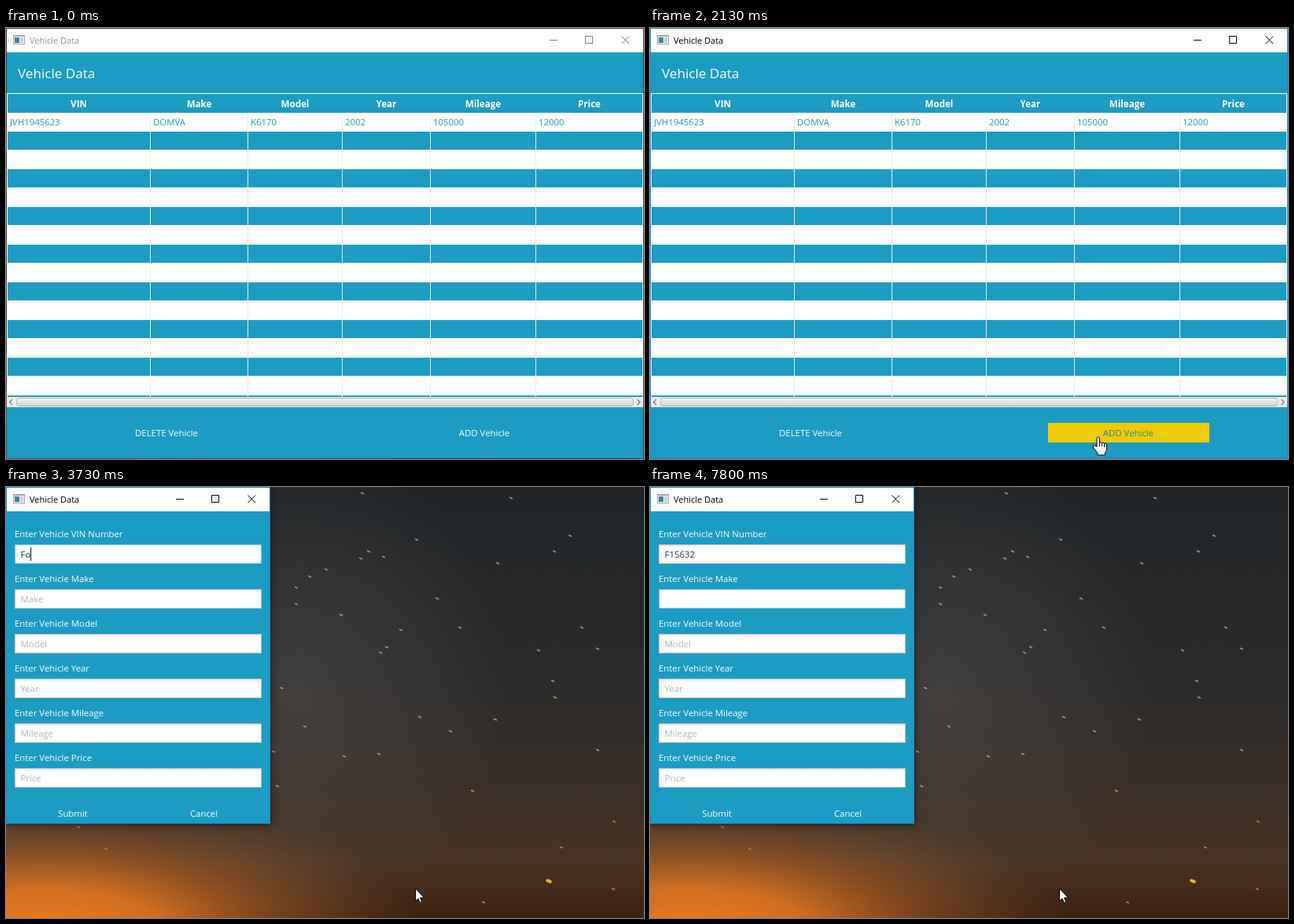
An HTML page that plays this animation: 811 by 549 pixels, repeating every 8000 ms.

```html
<!DOCTYPE html>
<html lang="en">
<head>
<meta charset="utf-8">
<title>Vehicle Data</title>
<style>
  html, body { margin: 0; height: 100%; overflow: hidden; background: #25282c; }
  svg { display: block; width: 100vw; height: 100vh; }
  text { font: 11.4px "Open Sans", "Noto Sans", sans-serif; fill: #fff; white-space: pre; }
  text.title { font-size: 11px; fill: #000; }
  text.heading { font-size: 17.1px; }
  text.bold { font-size: 11.6px; font-weight: 700; }
  text.cell { fill: #1c9cc2; }
  text.prompt { fill: #b2b2b2; }
  text.typed { fill: #333; }
  .mid { text-anchor: middle; }
  .body { fill: #1c9cc2; }
  .frame { fill: none; stroke: #1883d7; }
  .controls { fill: none; stroke: #000; }
  .idle .frame { stroke: rgba(72, 72, 72, .8); }
  .idle .title { fill: #959595; }
  .idle .controls { stroke: #808080; }
  .hot rect { fill: #efcb08; }
  .hot text { fill: #35819a; }
  #form { filter: drop-shadow(0 1px 4px rgba(0, 0, 0, .5)); }
  #arrow, #hand { fill: #fff; stroke: #000; stroke-linejoin: round; }
</style>
</head>
<body>
<svg id="stage" viewBox="0 0 811 549">
  <defs>
    <linearGradient id="sky" x2="0" y2="1">
      <stop offset="0" stop-color="#212528"/>
      <stop offset=".45" stop-color="#2b2b2b"/>
      <stop offset=".68" stop-color="#392f28"/>
      <stop offset=".87" stop-color="#493322"/>
      <stop offset="1" stop-color="#3e210f"/>
    </linearGradient>
    <radialGradient id="haze">
      <stop offset="0" stop-color="#77706c" stop-opacity=".28"/>
      <stop offset="1" stop-color="#77706c" stop-opacity="0"/>
    </radialGradient>
    <radialGradient id="glow">
      <stop offset="0" stop-color="#ec7c22"/>
      <stop offset=".3" stop-color="#e07622" stop-opacity=".9"/>
      <stop offset=".65" stop-color="#b8682c" stop-opacity=".4"/>
      <stop offset="1" stop-color="#8a5a35" stop-opacity="0"/>
    </radialGradient>
    <linearGradient id="thumbFill" x2="0" y2="1">
      <stop offset="0" stop-color="#f4f4f4"/>
      <stop offset="1" stop-color="#d2d2d2"/>
    </linearGradient>
    <linearGradient id="fieldFill" x2="0" y2="1">
      <stop offset="0" stop-color="#e9e9e9"/>
      <stop offset=".16" stop-color="#fff"/>
    </linearGradient>
  </defs>
  <g id="desktop">
    <rect width="811" height="549" fill="url(#sky)"/>
    <ellipse cx="370" cy="250" rx="270" ry="300" fill="url(#haze)"/>
    <ellipse cx="50" cy="560" rx="480" ry="165" fill="url(#glow)"/>
  </g>
  <g id="list"></g>
  <g id="form"></g>
  <path id="arrow" d="M.5.5V16.5L4 13.2 6.4 18.5 8.8 17.4 6.5 12.2H11.6Z"/>
  <path id="hand" d="M-2 1.5a1.75 1.5 0 0 1 3.5 0V7q2-.8 3 .6q2-.8 3 .7q3-.4 3 1.7V15q0 3-2 5V23H-1V20.5L-6 14q-1.5-2 0-3t4 1.5ZM1.5 7v5M4.5 8v4M7.5 9v4"/>
</svg>
<script>
const $ = id => document.getElementById(id);
const desktop = $("desktop"), list = $("list"), form = $("form");
const arrow = $("arrow"), hand = $("hand");

function add(parent, tag, attrs, content = "") {
  const el = document.createElementNS("http://www.w3.org/2000/svg", tag);
  for (const name in attrs) el.setAttribute(name, attrs[name]);
  el.textContent = content;
  return parent.appendChild(el);
}
const box = (parent, x, y, width, height, attrs) =>
  add(parent, "rect", { x, y, width, height, ...attrs });
const label = (parent, x, y, content, cls = "") =>
  add(parent, "text", { x, y, class: cls }, content);
const show = (el, on) => { el.style.display = on ? "" : "none"; };

// Desktop stars: x, y pairs
const stars = [
  642,14, 453,8, 717,62, 522,67, 461,82, 697,82, 480,89, 451,91, 625,97, 407,105,
  386,114, 369,128, 548,142, 369,149, 426,163, 577,179, 732,179, 502,182, 484,204,
  752,206, 677,208, 476,211, 695,247, 350,256, 698,268, 526,293, 622,296, 380,305,
  565,311, 752,335, 340,337, 474,340, 430,343, 345,381, 593,387, 773,426, 92,433,
  706,459, 127,461, 690,502, 772,512, 607,529];
for (let i = 0; i < stars.length; i += 2) {
  const x = stars[i], y = stars[i + 1], gold = x === 690;
  add(desktop, "ellipse", {
    rx: gold ? 4 : 2.6, ry: gold ? 2.2 : 1.1,
    fill: gold ? "#eab52e" : y > 400 ? "#b9703c" : y > 240 ? "#a58a6c" : "#8b8a86",
    transform: `translate(${x} ${y}) rotate(25)`
  });
}

function addWindow(parent, w, h) {
  box(parent, 0.5, 0.5, w - 1, h - 1, { class: "frame" });
  box(parent, 1, 1, w - 2, 30, { fill: "#fff" });
  box(parent, 1, 31, w - 2, h - 32, { class: "body" });
  box(parent, 9.5, 9.5, 14, 11, { fill: "#f4f4f4", stroke: "#a3a8ab" });
  box(parent, 9, 9, 15, 2, { fill: "#a3a8ab" });
  box(parent, 11, 12, 6, 7, { fill: "#3f7f9e" });
  box(parent, 18, 12, 4, 7, { fill: "#c9d3d8" });
  label(parent, 30, 20, "Vehicle Data", "title");
  const x = w - 120;
  add(parent, "path", {
    class: "controls",
    d: `M${x} 15.5h10M${x + 45.5} 10.5h9v9h-9zM${x + 91.5} 10.5l9.5 9.5m0-9.5l-9.5 9.5`
  });
}

// Vehicle list
addWindow(list, 811, 549);
label(list, 15, 64, "Vehicle Data", "heading");
box(list, 1, 83, 809, 387, { fill: "#fff" });
box(list, 2, 84, 807, 24, { class: "body" });
for (let y = 132; y <= 468; y += 48)
  box(list, 2, y, 807, Math.min(23, 470 - y), { class: "body" });

const edges = [1, 183, 307, 427, 539, 673, 809];
const heads = ["VIN", "Make", "Model", "Year", "Mileage", "Price"];
const car = ["JVH1945623", "DOMVA", "K6170", "2002", "105000", "12000"];
heads.forEach((head, i) => {
  box(list, edges[i + 1], 108, 1, 362, { fill: "#ececec" });
  label(list, (edges[i] + edges[i + 1] + 1) / 2, 101, head, "bold mid");
  label(list, edges[i] + 4, 124, car[i], "cell");
});

box(list, 1, 470, 809, 13, { fill: "#ebebeb" });
const thumb = box(list, 13.5, 471.5, 784, 10, { rx: 3, fill: "url(#thumbFill)", stroke: "#b4b4b4" });
add(list, "path", {
  d: "M8 473l-3.5 3.5L8 480M802.5 473l3.5 3.5-3.5 3.5",
  fill: "none", stroke: "#777", "stroke-width": 1.2
});
label(list, 204, 520, "DELETE Vehicle", "mid");
const addButton = add(list, "g");
box(addButton, 506, 503, 205, 25, { class: "body" });
label(addButton, 608, 520, "ADD Vehicle", "mid");

// Entry form
addWindow(form, 336, 429);
const fields = ["VIN Number", "Make", "Model", "Year", "Mileage", "Price"].map((name, i) => {
  const y = 73 + 57 * i;
  label(form, 11, y - 9, "Enter Vehicle " + name);
  return {
    y,
    rim: box(form, 11, y, 314, 25),
    inner: box(form, 12, y + 1, 312, 23),
    prompt: label(form, 18.5, y + 17, i ? name : "", "prompt")
  };
});
label(form, 85, 420, "Submit", "mid");
label(form, 251.5, 420, "Cancel", "mid");
const typed = label(form, 18.5, 90, "", "typed");
const caret = box(form, 18, 77, 1.2, 17, { fill: "#333" });

// Times below count ticks of 1/15 s
const LOOP = 8000, TICK = 1000 / 15;
const CLICK = 32, OPEN = 33, TAB = 109;

// tick, x, y
const path = [
  [6, 51, 16], [7, 73, 31], [9, 73, 31], [22, 440, 525], [23, 498, 532], [24, 546, 537],
  [28, 570, 521], [33, 570, 521], [35, 538, 514], [37, 520, 511]];

// tick, text, caret on
const typing = [
  [33, "", 1], [40, "", 0], [47, "F", 1], [50, "Fo", 1], [53, "For", 1], [56, "Fo", 1],
  [59, "F", 1], [61, "", 1], [68, "", 0], [76, "", 1], [80, "F", 1], [88, "F", 0],
  [91, "F1", 1], [93, "F15", 1], [96, "F156", 1], [100, "F1563", 1], [103, "F15632", 1],
  [TAB, "F15632", 1], [117, "F15632", 0]];

function pointerAt(k) {
  const i = path.findIndex(p => p[0] > k);
  if (i < 0) return path.at(-1).slice(1);
  const [k0, x0, y0] = path[Math.max(i - 1, 0)], [k1, x1, y1] = path[i];
  const f = (k - k0) / (k1 - k0);
  return [Math.round(x0 + (x1 - x0) * f), Math.round(y0 + (y1 - y0) * f)];
}

function drawPointer(k) {
  const [x, y] = pointerAt(k);
  const over = k < OPEN && x >= 506 && x < 711 && y >= 503 && y < 528;
  const onThumb = k >= 6 && y >= 470 && y < 483;
  addButton.setAttribute("class", over ? "hot" : "");
  thumb.setAttribute("fill", onThumb ? "#f8f8f8" : "url(#thumbFill)");
  show(arrow, k >= 6 && !over);
  show(hand, over);
  for (const el of [arrow, hand]) el.setAttribute("transform", `translate(${x} ${y})`);
}

function drawForm(k) {
  const [, text, caretOn] = typing.findLast(s => s[0] <= k);
  const active = k < TAB ? 0 : 1;
  fields.forEach((f, i) => {
    const on = i === active;
    f.rim.setAttribute("fill", on ? "#039ed3" : "#bdbdbd");
    f.inner.setAttribute("fill", on ? "#fff" : "url(#fieldFill)");
    f.inner.setAttribute("stroke", on ? "#d9f0f9" : "none");
    show(f.prompt, !on);
  });
  typed.textContent = text;
  const advance = active || !text ? 0 : typed.getComputedTextLength();
  caret.setAttribute("x", 18.2 + advance);
  caret.setAttribute("y", fields[active].y + 4);
  show(caret, caretOn);
}

function draw(now) {
  const k = Math.floor((now % LOOP + 5) / TICK) % 120;
  list.setAttribute("class", k < CLICK ? "idle" : "");
  show(list, k < OPEN);
  show(form, k >= OPEN);
  drawPointer(k);
  if (k >= OPEN) drawForm(k);
  requestAnimationFrame(draw);
}
draw(performance.now());
</script>
</body>
</html>
```
